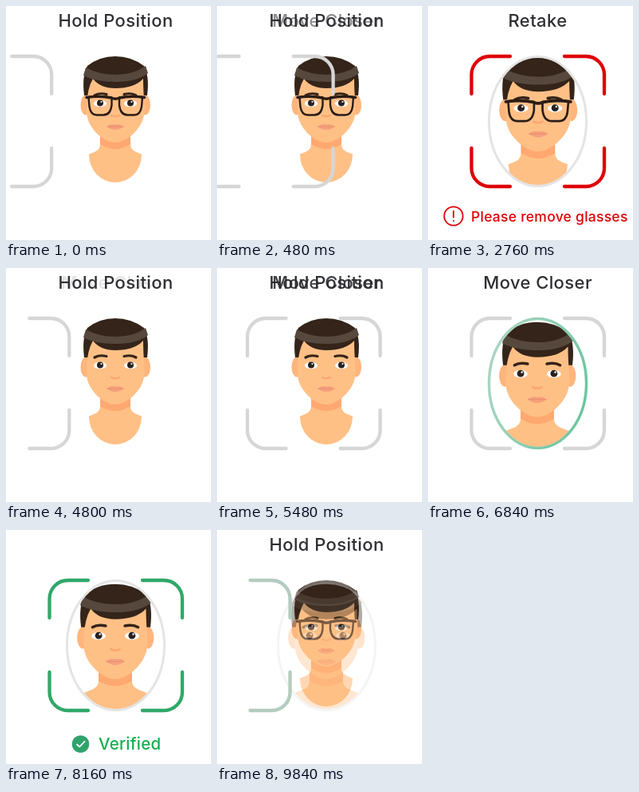
Recreate the animation shown at these times as an HTML page. Size 257 by 293 pixels, loop 9880 ms.

```html
<!DOCTYPE html>
<html lang="en">
<head>
<meta charset="utf-8">
<title>Face check</title>
<style>
  html, body { margin: 0; height: 100%; overflow: hidden; background: #fff; }
  svg { display: block; width: 100vw; height: 100vh; }
  text { font: 500 22px Inter, sans-serif; letter-spacing: .25px; fill: #2e2e33; }
  .title { text-anchor: middle; letter-spacing: .4px; }
  .line { fill: none; stroke-linecap: round; stroke-linejoin: round; }
</style>
</head>
<body>
<svg viewBox="0 0 257 293">
  <defs>
    <clipPath id="oval"><ellipse cx="137.5" cy="144.5" rx="61" ry="81"/></clipPath>
    <clipPath id="badge"><path d="M70 50H210V186H170A33 35 0 0 1 104 186H70Z"/></clipPath>
    <linearGradient id="sweep" x1="0" y1=".3" x2="1" y2=".7">
      <stop id="sweepL"/><stop id="sweepR" offset="1"/>
    </linearGradient>
    <g id="bust">
      <path fill="#ffc086" d="M118 150V173Q118 181 108 184Q92 189 88 200V235H186V200Q182 189 166 184Q156 181 156 173V150Z"/>
      <path fill="#ffa870" d="M118 158H156V173Q137 185 118 173Z"/>
      <g fill="#ffb57c"><ellipse cx="100" cy="124" rx="6.5" ry="12.5"/><ellipse cx="174.5" cy="124" rx="6.5" ry="12.5"/></g>
      <path fill="#342419" d="M98 112Q95 88 102 75Q117 63 137 63T173 75Q180 88 177 112Z"/>
      <path fill="#ffc086" d="M101 124Q102 103 109 91Q118 103 137 103Q161 103 172 91Q172 104 173.500 124V132C173 153 151 171 137 171S101 153 101 132Z"/>
      <path fill="#57483e" d="M100 77Q116 86 138 86T175 75L178 84Q164 95 138 95Q112 95 97 87Z"/>
      <path class="line" stroke="#342419" stroke-width="3.2" d="M111 112Q117 108.500 126 110.500M148 110.500Q157 108.500 163 112"/>
      <g fill="#fff"><ellipse cx="118" cy="122" rx="8" ry="4.3"/><ellipse cx="156" cy="122" rx="8" ry="4.3"/></g>
      <g fill="#29211f"><circle cx="118" cy="121.5" r="4"/><circle cx="156" cy="121.5" r="4"/></g>
      <g fill="#fff"><circle cx="119.5" cy="120" r="1.1"/><circle cx="157.5" cy="120" r="1.1"/></g>
      <path class="line" stroke="#fba76f" stroke-width="2.5" d="M132 137Q137 139.500 142 137"/>
      <path fill="#f5a07c" d="M126 151Q132 146.500 137 148.500Q142 146.500 148 151Q137 159 126 151Z"/>
      <path class="line" stroke="#ea8b6b" stroke-width=".8" d="M127 151H147"/>
    </g>
    <g id="specs" class="line" stroke="#2b1c16" stroke-width="2.4">
      <path id="lens" d="M103.500 114Q118 112 132.500 114.500V124Q131 136.500 122 136.500H114Q106 136.500 104.500 126Z"/>
      <use href="#lens" transform="matrix(-1 0 0 1 274.5 0)"/>
      <path stroke-width="3.4" d="M101 114.500Q118 112 132 115Q137 117.500 142.500 115Q156 112 173.500 114.500"/>
    </g>
  </defs>

  <path id="trace" class="line" stroke="#f6f6f6" stroke-width="2" d="M104 76A61 81 0 0 0 104 213"/>
  <g id="small"><g clip-path="url(#badge)"><use href="#bust"/></g><use id="smallSpecs" href="#specs"/></g>
  <g id="big">
    <ellipse cx="137.5" cy="144.5" rx="61" ry="81" fill="#fff"/>
    <g clip-path="url(#oval)">
      <g id="zoom"><g id="bigBust"><use href="#bust"/></g><use id="bigSpecs" href="#specs"/></g>
    </g>
    <ellipse cx="137.5" cy="144.5" rx="61" ry="81" fill="none" stroke="#e4e4e4" stroke-width="3"/>
    <ellipse id="scan" cx="137.5" cy="144.5" rx="61" ry="81" fill="none" stroke="url(#sweep)" stroke-width="3.4"/>
  </g>

  <path id="corners" class="line" stroke-width="4.3" d="M54.500 110V86A23 23 0 0 1 77.500 63H103M171 63H198A23 23 0 0 1 221 86V110M221 178V203A23 23 0 0 1 198 226H171M103 226H77.500A23 23 0 0 1 54.500 203V178"/>

  <text id="hold" class="title" x="137.5" y="26">Hold Position</text>
  <text id="closer" class="title" x="137.5" y="26">Move Closer</text>
  <text id="retake" class="title" x="137.5" y="26">Retake</text>

  <g id="warning">
    <circle cx="32" cy="263" r="11.7" fill="none" stroke="#de0005" stroke-width="1.8"/>
    <path class="line" stroke="#de0005" stroke-width="2" d="M32 257V264.500M32 269V269.100"/>
    <text x="54" y="270" style="font-size:17.5px;fill:#de0005">Please remove glasses</text>
  </g>
  <g id="verified">
    <circle cx="93.5" cy="268" r="10.8" fill="#2fa36b"/>
    <path class="line" stroke="#fff" stroke-width="1.8" d="M89 268.500L92.200 271.500L98.500 264.800"/>
    <text x="116" y="274.5" style="font-size:20.5px;fill:#15ae4d">Verified</text>
  </g>
</svg>
<script>
const LOOP = 9880, SECOND = 4680;
const GRAY = [214, 214, 214], GREEN = [47, 168, 105], RED = 'rgb(222,0,5)';
const RING = [228, 228, 228], RING_GREEN = [56, 186, 130];
const el = id => document.getElementById(id);
const ramp = (t, start, span) => Math.min(1, Math.max(0, (t - start) / span));
const mix = (a, b, p) => `rgb(${a.map((v, i) => Math.round(v + (b[i] - v) * p))})`;
const set = (id, name, value) => el(id).setAttribute(name, value);
const fade = (id, opacity) => set(id, 'opacity', Number(opacity));

function draw(t) {
  const second = t >= SECOND + 40;
  const local = second ? t - SECOND : t;
  const slide = ramp(local, 0, 890);
  const grow = ramp(local, 1640, 300);
  const retake = t >= 2760 && !second;
  const scan = ramp(t, 6620, 680);
  const done = ramp(t, 7340, 800);
  const reset = ramp(t, 9620, 280);

  set('corners', 'transform', `translate(${-164 * (reset || 1 - slide)} 0)`);
  set('corners', 'stroke', retake ? RED : mix(GRAY, GREEN, done * (1 - reset)));

  // The large face always dissolves on top of the solid small one.
  fade('small', grow < 1 || reset > 0);
  fade('smallSpecs', !second || reset > 0);
  fade('big', reset ? 1 - reset * reset : grow);
  fade('bigSpecs', !second);
  fade('trace', slide === 1 && grow < 1);
  set('zoom', 'transform', second ? 'matrix(1.1 0 0 1.1 -13.7 -1.5)' : 'matrix(1.12 0 0 1.1 -15.5 -6)');
  set('bigBust', 'clip-path', second ? 'none' : 'url(#badge)');

  // The green ring strengthens from its right side first.
  set('sweepL', 'stop-color', mix(RING, RING_GREEN, scan));
  set('sweepR', 'stop-color', mix(RING, RING_GREEN, Math.min(1, scan * 2.2)));
  fade('scan', scan > 0 ? 1 - done : 0);

  fade('hold', slide < 1 || reset > 0);
  fade('closer', retake ? 0 : slide * (1 - done));
  fade('retake', retake);
  fade('warning', retake);
  fade('verified', reset ? 0 : done);
}

function tick() {
  draw(performance.now() % LOOP);
  requestAnimationFrame(tick);
}
tick();
</script>
</body>
</html>
```
